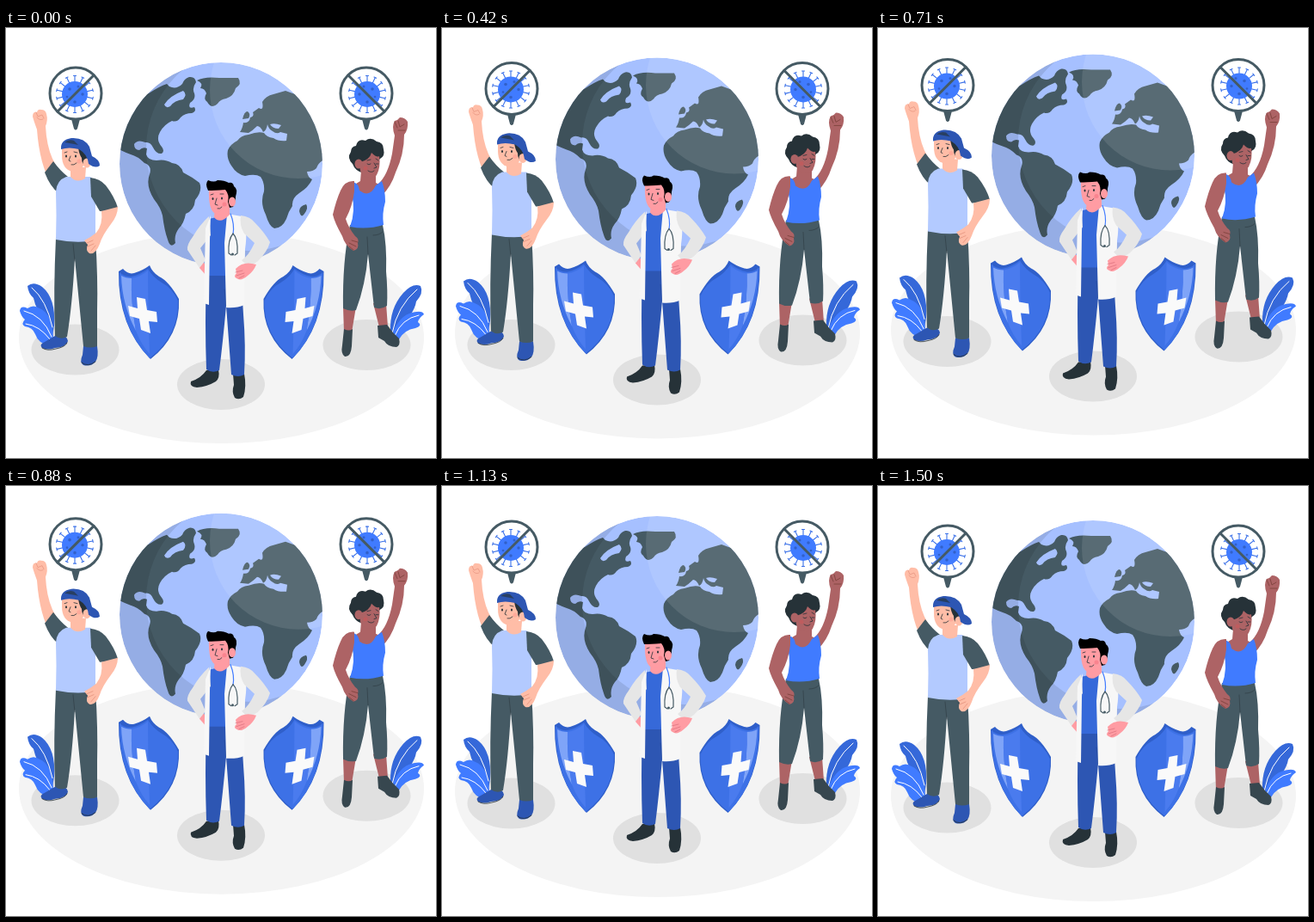
Animation of 500x500 px, one loop 1.54 s. Source, as an HTML page:

```html
<!DOCTYPE html>
<html lang="en">
<head>
<meta charset="utf-8">
<title>Global health</title>
<style>
html, body { margin: 0; width: 100%; height: 100%; overflow: hidden; background: #fff; }
svg { display: block; width: 100vw; height: 100vh; }
path { stroke-linecap: round; stroke-linejoin: round; }
.dark { fill: #455a64; }
.ink { fill: #263238; }
.blue { fill: #407bff; }
.navy { fill: #2d56b3; }
.sky { fill: #a6c0ff; }
.tan { fill: #ffbda7; }
.pink { fill: #ff9ca3; }
.brown { fill: #ad6365; }
.line { fill: none; stroke: #263238; stroke-width: .8; }
.vein { fill: none; stroke: #fff; stroke-width: 1; }
</style>
</head>
<body>
<svg viewBox="0 0 500 500">
<defs>
  <clipPath id="ball"><circle cx="250" cy="158" r="118"/></clipPath>
  <g id="shield">
    <path fill="#2f5fca" d="M131 283L136 280Q142 287 149 285Q159 282 167 276Q170 284 178 289Q189 294 201 315Q203 358 168 385Q130 347 131 283Z"/>
    <path fill="#3d71e6" d="M132 284Q138 290 146 289Q156 287 165 280Q171 290 181 296Q193 302 200 317Q201 358 167 384Q131 347 132 284Z"/>
    <path fill="#7fa4f8" d="M134 288Q139 291 146 291Q145 319 151 352Q135 322 134 288Z"/>
    <path fill="#4a7bee" d="M146 291Q157 289 165 282Q165 330 167 379Q157 368 151 352Q145 319 146 291Z"/>
    <path fill="#fafafa" d="M152 313L162 315L164 328L175 330L176 342L166 341L168 355L157 351L155 338L144 335L142 323L153 326Z"/>
  </g>
  <g id="pin">
    <path class="dark" d="M75.500 104H86.500L83 117Q81 120 79 117Z"/>
    <circle cx="81" cy="76" r="30" fill="#fff" stroke="#455a64" stroke-width="3"/>
    <g id="virus" fill="none" stroke="#3a70e8" stroke-width="1.1"></g>
    <circle class="blue" cx="80" cy="77" r="15"/>
    <g fill="#2d56b3" opacity=".7">
      <circle cx="74" cy="71" r="1.8"/><circle cx="84" cy="68" r="1.5"/><circle cx="89" cy="77" r="1.7"/>
      <circle cx="80" cy="86" r="1.8"/><circle cx="71" cy="80" r="1.3"/>
    </g>
    <path d="M102 55L60 97" stroke="#455a64" stroke-width="3"/>
  </g>
</defs>

<g id="scene">
  <ellipse cx="250.5" cy="360" rx="235.5" ry="123" fill="#f4f4f4"/>

  <g clip-path="url(#ball)">
    <circle class="sky" cx="250" cy="158" r="118"/>
    <g class="dark">
      <path d="M166 76Q178 68 187 65L190 68Q198 72 205 65Q207 59 213 57Q220 56 221 63Q216 70 219 76Q221 83 214 87Q211 95 219 92Q222 97 216 99Q208 99 203 104Q199 110 193 108Q184 112 179 121Q174 130 181 138Q185 143 181 146Q175 147 171 139Q168 132 162 133Q153 129 149 135Q149 142 155 142Q159 138 164 140L163 147Q165 154 175 154Q185 152 193 157Q203 158 206 168Q216 173 225 180Q229 189 220 200Q219 212 209 216Q207 227 201 233Q195 241 197 250Q191 257 188 246Q184 235 182 218Q180 209 172 199Q162 183 167 170Q170 160 161 157Q153 149 145 147Q136 144 125 138V90Z"/>
      <path d="M222 61Q231 56 248 58L270 58Q275 65 267 70Q265 79 256 82Q249 83 246 88Q239 95 234 86Q229 83 233 76Q231 70 226 70Q230 64 222 61Z"/>
      <path d="M272 121Q275 117 276 110Q283 111 284 104Q289 103 287 98L294 93Q300 97 298 86Q302 79 311 77L325 73L350 82L380 150Q364 153 361 163Q357 167 350 167Q351 174 356 176Q352 185 341 192Q332 198 333 207Q328 214 326 222Q321 233 312 233Q306 231 302 217Q295 203 300 190Q301 180 296 173Q290 169 278 172Q268 170 262 160Q256 151 258 142Q261 135 269 131Q273 125 282 124Q293 120 300 122Q303 127 311 128Q317 132 326 131L327 123L319 121Q315 124 310 120Q305 117 304 112Q303 119 299 121Q296 114 292 114Q287 119 282 122Z"/>
      <path d="M341 213Q341 207 349 205Q352 209 347 216Q343 222 341 213Z"/>
      <path d="M275 106Q277 97 281 97Q285 100 282 105Z"/>
    </g>
    <g class="sky">
      <path d="M184 89Q190 79 206 73Q211 77 206 83Q196 84 191 91Q186 94 184 89Z"/>
      <path d="M307 112Q312 110 320 113L317 117Q310 117 307 112Z"/>
    </g>
    <circle cx="340" cy="72" r="103" fill="#fff" opacity=".1"/>
    <path fill="#000" fill-rule="evenodd" opacity=".1" d="M120 30H390V290H120ZM163 140A119 119 0 0 0 401 140A119 119 0 0 0 163 140Z"/>
  </g>

  <use href="#pin"/>
  <use href="#pin" transform="translate(500 0) scale(-1 1)"/>

  <g fill="#e0e0e0">
    <ellipse cx="80.5" cy="374" rx="51" ry="29.5"/>
    <ellipse cx="250" cy="414.5" rx="51" ry="29.5"/>
    <ellipse cx="419.5" cy="368.5" rx="51" ry="29.5"/>
  </g>

  <g fill="#3568d9">
    <path d="M56 346Q58 314 42 301Q32 294 25 300Q26 309 32 314Q35 329 46 341L54 358Z"/>
    <path class="blue" d="M55 361Q54 332 39 326Q32 321 25 326Q17 322 16 329Q18 336 22 339Q17 344 22 347Q31 348 34 356Q38 368 51 369Z"/>
    <path class="vein" d="M30 302Q47 316 54 348M21 329Q43 334 53 359M23 344Q39 346 51 362"/>
    <path d="M447 352Q446 326 462 308Q473 296 482 300Q486 308 477 318Q475 333 449 359Z"/>
    <path class="blue" d="M447 362Q455 337 469 332Q484 327 486 333Q480 337 479 342Q485 346 476 349Q463 351 457 362Z"/>
    <path class="vein" d="M478 304Q455 323 449 355M480 334Q460 338 452 358"/>
  </g>

  <use href="#shield"/>
  <use href="#shield" transform="translate(500.5 0) scale(-1 1)"/>

  <!-- man with cap -->
  <g>
    <path class="tan" d="M36 118Q32 107 31 103Q31 97 36 98Q37 94 41 95Q46 95 47 100Q49 107 46 114Q47 136 54 152L63 169L53 182Q39 159 36 118Z"/>
    <path fill="none" stroke="#e4937e" stroke-width=".7" d="M35 98L37 103L42 101L44 105M36 104Q39 108 43 106"/>
    <path class="dark" d="M45 168L55 155Q63 166 72 173L61 192Q51 184 45 168Z"/>
    <path class="navy" d="M57 358Q71 356 72 364Q70 371 57 372Q49 375 42 372Q38 368 45 365Z"/>
    <path class="navy" d="M90 370H106Q108 383 104 388Q99 394 90 392Q85 389 89 380Z"/>
    <path class="line" d="M42 372Q48 376 58 373Q69 371 71 366M88 389Q95 395 104 388"/>
    <path class="dark" d="M58 244H104Q107 292 106 328L106 370Q98 373 90 370L80 268Q77 323 71 359Q64 363 57 358Q55 305 58 244Z"/>
    <path class="line" opacity=".6" d="M80 271L78 251M93 252Q99 256 103 253"/>
    <path fill="#b3caff" d="M70 173L98 173Q106 178 104 197L104 247Q82 251 58 246Q59 217 58 190Q59 177 70 173Z"/>
    <path class="dark" d="M98 174Q109 175 116 183Q126 196 130 209Q123 213 109 213L99 196Z"/>
    <path class="tan" d="M130 208Q130 218 122 228Q112 241 109 251Q104 264 97 262Q92 259 95 252L91 247Q99 243 105 238Q113 228 111 213Z"/>
    <path fill="none" stroke="#e4937e" stroke-width=".8" d="M94 250L101 247M95 254L102 251M99 259L104 253"/>
    <path class="tan" d="M75 162H93L92 175Q82 181 75 173Z"/>
    <path class="tan" d="M65 140Q78 135 93 141L91 157Q88 169 77 167Q65 164 65 148Z"/>
    <path class="ink" d="M84 139L98 144Q99 154 93 160Q88 159 88 151Q85 147 84 139Z"/>
    <ellipse class="tan" cx="94" cy="157" rx="4.5" ry="5.5"/>
    <path class="navy" d="M64 141Q63 130 76 128Q91 127 97 138L100 149Q109 153 109 160Q104 164 96 158Q95 147 85 141Q73 138 64 141Z"/>
    <path class="ink" opacity=".65" d="M68 133Q73 129 79 131L84 136Q74 134 68 133Z"/>
    <ellipse class="ink" cx="70" cy="149" rx="1" ry="1.5"/><ellipse class="ink" cx="81" cy="149" rx="1" ry="1.5"/>
    <path class="line" d="M68 145L71 144M79 144L83 145M75 149L73 154L75 155M76 159Q79 160 82 157"/>
    <circle cx="85" cy="155" r="2.5" fill="#ff9c91" opacity=".6"/>
  </g>

  <!-- woman -->
  <g>
    <path class="brown" d="M432 182Q444 172 449 146L452 125Q448 114 452 108Q456 107 458 104Q464 104 467 109Q468 118 463 124Q463 147 453 168Q448 184 437 195Z"/>
    <path fill="none" stroke="#793f39" stroke-width=".8" d="M452 109L455 116M456 108L458 115L463 112M456 119L464 119"/>
    <path class="brown" d="M392 324H407L402 354H393ZM427 320H442L444 348H434Z"/>
    <g fill="#37474f">
      <path d="M393 350Q399 353 403 350L402 370Q401 383 394 382Q389 379 391 369Z"/>
      <path d="M432 346L443 345Q449 354 457 361Q459 369 454 371Q444 371 440 364L433 360Z"/>
    </g>
    <path class="dark" d="M400 229H438Q443 251 442 283Q444 306 443 323Q436 328 428 325L421 263Q418 299 407 328Q400 330 392 326Q391 271 400 229Z"/>
    <path class="line" opacity=".6" d="M421 263L420 243M427 241Q434 241 438 237"/>
    <path class="brown" d="M413 166H430V180L438 184Q438 195 423 202Q409 204 402 184L412 178Z"/>
    <path class="blue" d="M404 179Q410 181 411 189Q423 198 430 183L437 178Q441 188 441 202Q437 216 439 229Q419 235 400 231Q407 212 402 194Z"/>
    <path class="brown" d="M405 178Q394 177 389 189Q384 200 380 217Q382 226 391 242Q394 253 404 259Q411 257 409 250Q411 245 406 242Q398 232 395 222Q403 207 405 190Z"/>
    <path fill="none" stroke="#793f39" stroke-width=".8" d="M402 247L409 249M399 250L407 254M399 254L404 258"/>
    <path class="ink" d="M403 158Q396 151 401 144Q401 138 407 137Q409 128 418 131Q424 126 431 132Q439 133 439 141Q441 149 435 152L428 160L414 168Q406 166 403 158Z"/>
    <path class="brown" d="M412 156Q423 153 425 145Q431 151 434 149Q436 161 431 171Q426 177 416 172Q410 168 412 156Z"/>
    <ellipse class="brown" cx="410" cy="158" rx="4.500" ry="5.500"/>
    <path class="line" d="M420 154L424 153M430 152L433 154M428 157L431 162L428 163M420 158Q422 160 424 158M430 158L433 158M421 166Q425 169 428 166"/>
    <circle cx="418" cy="163" r="2.500" fill="#c9595a" opacity=".6"/>
  </g>

  <!-- doctor -->
  <g>
    <path class="ink" d="M233 398L247 397Q249 407 244 411Q234 417 222 418Q213 417 215 411Q227 407 233 398ZM264 402L277 402Q280 417 276 429Q271 433 266 430Q262 423 265 415Z"/>
    <path class="navy" d="M233 284H273L276 333Q279 370 277 403Q270 407 262 403L256 323Q252 367 248 398Q240 402 233 397Q231 343 233 284Z"/>
    <path fill="none" stroke="#244a9c" stroke-width=".8" d="M256 323L254 304"/>
    <path fill="#3669d9" d="M236 222L258 217L263 288H234Z"/>
    <path class="pink" d="M225 269L232 275V287L225 279Z"/>
    <path fill="#e6e6e6" d="M236 219Q225 229 217 243Q210 252 211 258L225 279L232 270L226 256L238 241Z"/>
    <path fill="#f7f7f7" d="M238 218L232 233L230 320L236 322L237 246Z"/>
    <path fill="#f7f7f7" d="M257 216L274 219Q282 231 278 257L277 322Q268 326 256 325L254 250Z"/>
    <path fill="#e6e6e6" d="M273 218Q284 219 290 227Q300 237 307 249Q304 260 293 271L282 278L274 270Q282 265 289 250L277 239Q271 229 273 218Z"/>
    <path class="pink" d="M267 280Q275 272 286 274L291 275Q288 283 281 288Q273 295 268 291Q264 289 268 285Z"/>
    <path fill="none" stroke="#d96f7b" stroke-width=".7" d="M267 284L275 282M268 288L277 285M271 291L277 288"/>
    <path class="pink" d="M243 208L260 205L260 217Q249 229 242 220Z"/>
    <path class="pink" d="M236 187L260 185Q264 203 259 211Q252 219 244 216Q235 213 236 187Z"/>
    <path d="M235 189Q231 181 235 177Q242 180 246 177Q254 177 259 180Q264 179 265 184Q270 187 267 196Q267 203 264 208L260 209L258 202Q260 194 255 188Q242 189 235 189Z"/>
    <ellipse class="pink" cx="263" cy="202" rx="4" ry="5.500"/>
    <ellipse class="ink" cx="240.500" cy="198.500" rx="1" ry="1.500"/><ellipse class="ink" cx="251" cy="198" rx="1" ry="1.500"/>
    <path class="line" d="M238 194L241 193M249 193L253 193M245 198L243 205L246 206M246 210Q249 211 251 208"/>
    <circle cx="254" cy="205" r="2.500" fill="#f36b7c" opacity=".5"/>
    <g fill="none" stroke-width="1.200">
      <path stroke="#407bff" d="M261 216Q266 228 264 240"/>
      <path stroke="#455a64" d="M264 239Q258 246 259 262L262 264M264 239Q270 245 269 262L266 264"/>
    </g>
    <circle cx="263.500" cy="263" r="1.500" class="dark"/>
  </g>
</g>
</svg>
<script>
const virus = document.getElementById('virus');
const scene = document.getElementById('scene');
const SPIKES = 14, STEP = 125 / 3, LOOP = 1540, HALF = 18, LIFT = 10;

let spikes = '';
for (let i = 0; i < SPIKES; i++) {
  spikes += `<g transform="rotate(${i * 360 / SPIKES} 80 77)">` +
    '<path d="M80 63V56M78.500 55.500H81.500"/></g>';
}
virus.innerHTML = spikes;

// Linear rise and fall, held in steps of 24 per second on a 10 ms clock.
function draw(now) {
  const t = now % LOOP;
  const step = Math.min(2 * HALF, Math.floor((Math.floor(t / 10) * 10 + 5) / STEP));
  const y = -LIFT * (1 - Math.abs(1 - step / HALF));
  scene.setAttribute('transform', `translate(0 ${y.toFixed(3)})`);
}

function tick() {
  draw(performance.now());
  requestAnimationFrame(tick);
}
tick();
</script>
</body>
</html>
```
